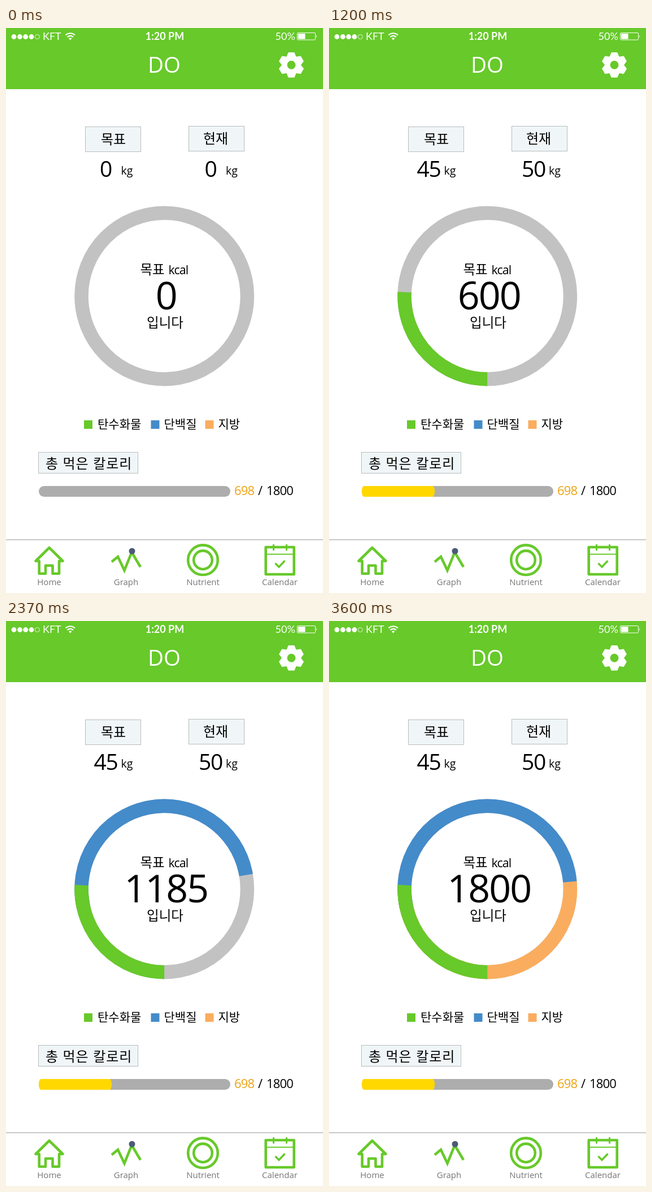
Write an HTML page that moves like this. It is 561 by 998 pixels and loops after 3.93 s.

```html
<!DOCTYPE html>
<html lang="ko">
<head>
<meta charset="utf-8">
<title>DO</title>
<style>
  html, body { margin: 0; width: 100%; height: 100%; overflow: hidden; background: #fff; }
  svg { display: block; width: 561px; height: 998px; }
  text { font-family: "Open Sans", "Noto Sans", sans-serif; }
  .ko { font-family: "Noto Sans CJK KR", "Noto Sans CJK", sans-serif; }
  .status { font-family: Lato, sans-serif; font-size: 18px; fill: #fff; }
  .mid { text-anchor: middle; }
  .big { font-size: 68px; letter-spacing: -1.9px; }
  .weight { font-size: 39px; letter-spacing: -1.2px; }
  .unit { font-size: 19.5px; }
  .sum { font-size: 22px; letter-spacing: -.85px; }
  .tab { font-size: 15px; fill: #757575; }
  .box { fill: #f0f6f7; stroke: #b9bcbd; }
  .ring circle { fill: none; stroke-width: 24.5; }
  .icon { fill: none; stroke: #67c92a; stroke-width: 4.6; }
</style>
</head>
<body>
<svg viewBox="0 0 561 998">
  <rect width="561" height="108" fill="#67c92a"/>

  <g fill="#fff">
    <circle cx="14" cy="15.5" r="4.4"/>
    <circle cx="24.5" cy="15.5" r="4.4"/>
    <circle cx="34.7" cy="15.5" r="4.4"/>
    <circle cx="45" cy="15.5" r="4.4"/>
    <circle cx="55.4" cy="15.5" r="4" fill="none" stroke="#fff" stroke-width=".8"/>
    <g fill="none" stroke="#fff" stroke-width="2.1">
      <path d="M105.5 12.6a11.6 11.6 0 0 1 16.4 0"/>
      <path d="M108.5 16a7.4 7.4 0 0 1 10.4 0"/>
    </g>
    <path d="M113.7 21.5l-2.7-2.9a3.9 3.9 0 0 1 5.4 0z"/>
    <rect x="515.5" y="8.5" width="32" height="12.5" rx="1.5" fill="none" stroke="#fff"/>
    <rect x="517" y="10" width="12.5" height="9.5"/>
    <path d="M549 12.5q2 2.2 0 4.4z"/>
  </g>
  <text class="status" x="65" y="21">KFT</text>
  <text class="status mid" x="281" y="20.5" font-weight="700">1:20 PM</text>
  <text class="status" x="476.5" y="20.5">50%</text>
  <text class="mid" x="280" y="79" font-size="38.5" fill="#fff">DO</text>
  <g id="gear" transform="translate(505 65.3)" fill="#fff" stroke="#fff" stroke-width="2" stroke-linejoin="round">
    <circle r="12.3" fill="none" stroke-width="9.6"/>
  </g>

  <rect class="box" x="140.5" y="174.5" width="98" height="44"/>
  <rect class="box" x="323.5" y="173.5" width="98" height="44"/>
  <text class="ko mid" x="190" y="205" font-size="24">목표</text>
  <text class="ko mid" x="371" y="204" font-size="24">현재</text>
  <text id="goal" class="weight mid" x="176.5" y="263"></text>
  <text id="now" class="weight mid" x="362" y="263"></text>
  <text class="unit" x="203.5" y="259">kg</text>
  <text class="unit" x="389" y="259">kg</text>

  <g class="ring" transform="translate(280.2 473.5)">
    <circle r="146.7" stroke="#c2c2c2"/>
    <circle id="fat" r="146.7" stroke="#faad5e" pathLength="360"/>
    <circle id="protein" r="146.7" stroke="#448bca" pathLength="360"/>
    <circle id="carb" r="146.7" stroke="#67c92a" pathLength="360"/>
  </g>
  <text class="ko" x="237.5" y="435" font-size="23.5">목표</text>
  <text x="287.5" y="434.5" font-size="21.5" letter-spacing="-.9">kcal</text>
  <text id="kcal" class="big mid" x="283.2" y="497"></text>
  <text class="ko mid" x="281.5" y="529" font-size="23.5">입니다</text>

  <rect x="138" y="693" width="15" height="15" fill="#67c92a"/>
  <rect x="256.5" y="693" width="15" height="15" fill="#448bca"/>
  <rect x="352.5" y="693" width="15" height="15" fill="#faad5e"/>
  <g font-size="21">
    <text class="ko" x="162" y="707">탄수화물</text>
    <text class="ko" x="279.5" y="707">단백질</text>
    <text class="ko" x="375.5" y="707">지방</text>
  </g>

  <rect class="box" x="57.5" y="749.5" width="176" height="37"/>
  <text class="ko" x="70" y="777.5" font-size="24" letter-spacing=".9">총 먹은 칼로리</text>
  <rect x="58" y="809" width="339" height="19" rx="9.5" fill="#adadad"/>
  <g transform="translate(58 809)"><rect id="bar" width="339" height="19" rx="9.5" fill="#ffd800"/></g>
  <text class="sum" x="404" y="824.5" fill="#eda313">698</text>
  <text class="sum" x="446" y="824.5">/</text>
  <text class="sum" x="461" y="824.5">1800</text>

  <rect y="903" width="561" height="1.7" fill="#c0c0c0"/>
  <g class="icon">
    <path d="M52.5 941.5L76.5 918L100.5 941.5H94V963.7H82.5V949.5H70V963.7H58.7V941.5Z" stroke-linejoin="round"/>
    <path d="M187 943L198 934L209.5 958L222.5 926L238 952"/>
    <circle cx="348.5" cy="939.7" r="26.3"/>
    <circle cx="348.5" cy="939.7" r="16.3"/>
    <rect x="459.7" y="917" width="50" height="48" stroke-linejoin="round"/>
    <path d="M460 929.5H510" stroke-width="2"/>
    <path d="M473.5 912V923M496.5 912V923" stroke-width="3"/>
    <path d="M476.5 945.5L483 952L493.5 941" stroke-width="3.4"/>
  </g>
  <circle cx="223" cy="924" r="5.5" fill="#4b5a76"/>
  <text class="tab mid" x="76.5" y="984">Home</text>
  <text class="tab mid" x="212.5" y="984">Graph</text>
  <text class="tab mid" x="348.5" y="984">Nutrient</text>
  <text class="tab mid" x="484.5" y="984">Calendar</text>
</svg>
<script>
  const LOOP = 3930, STEP = 30, END = 3600;
  const $ = id => document.getElementById(id);
  const progress = (t, start, length) => Math.min(1, Math.max(0, (t - start) / length));

  for (let a = 0; a < 360; a += 60) {
    const tooth = document.createElementNS("http://www.w3.org/2000/svg", "path");
    tooth.setAttribute("d", "M-7.6 -14L-4.7 -21.3H4.7L7.6 -14Z");
    tooth.setAttribute("transform", `rotate(${a})`);
    $("gear").append(tooth);
  }

  // Angles run clockwise from the bottom; each arc slides out from under the one before it.
  const arcs = [
    { id: "carb", from: 0, sweep: 92.7, start: 0 },
    { id: "protein", from: 78, sweep: 187, start: 1200 },
    { id: "fat", from: 264.6, sweep: 180, start: 2400 }
  ];
  for (const { id, from } of arcs) $(id).setAttribute("transform", `rotate(${90 + from})`);

  function draw(t) {
    for (const { id, sweep, start } of arcs) {
      const p = progress(t, start, 1200);
      $(id).style.visibility = p ? "visible" : "hidden";
      $(id).setAttribute("stroke-dasharray", `${sweep * p} 720`);
    }
    const intro = progress(t, 0, 600);
    $("goal").textContent = Math.round(45 * intro);
    $("now").textContent = Math.round(50 * intro);
    $("kcal").textContent = Math.round(1800 * progress(t, 0, END));
    $("bar").setAttribute("transform", `scale(${0.381 * intro} 1)`);
  }

  const origin = performance.now();
  function tick() {
    const t = (performance.now() - origin) % LOOP;
    draw(Math.floor(t / STEP) * STEP);
    requestAnimationFrame(tick);
  }
  tick();
</script>
</body>
</html>
```
